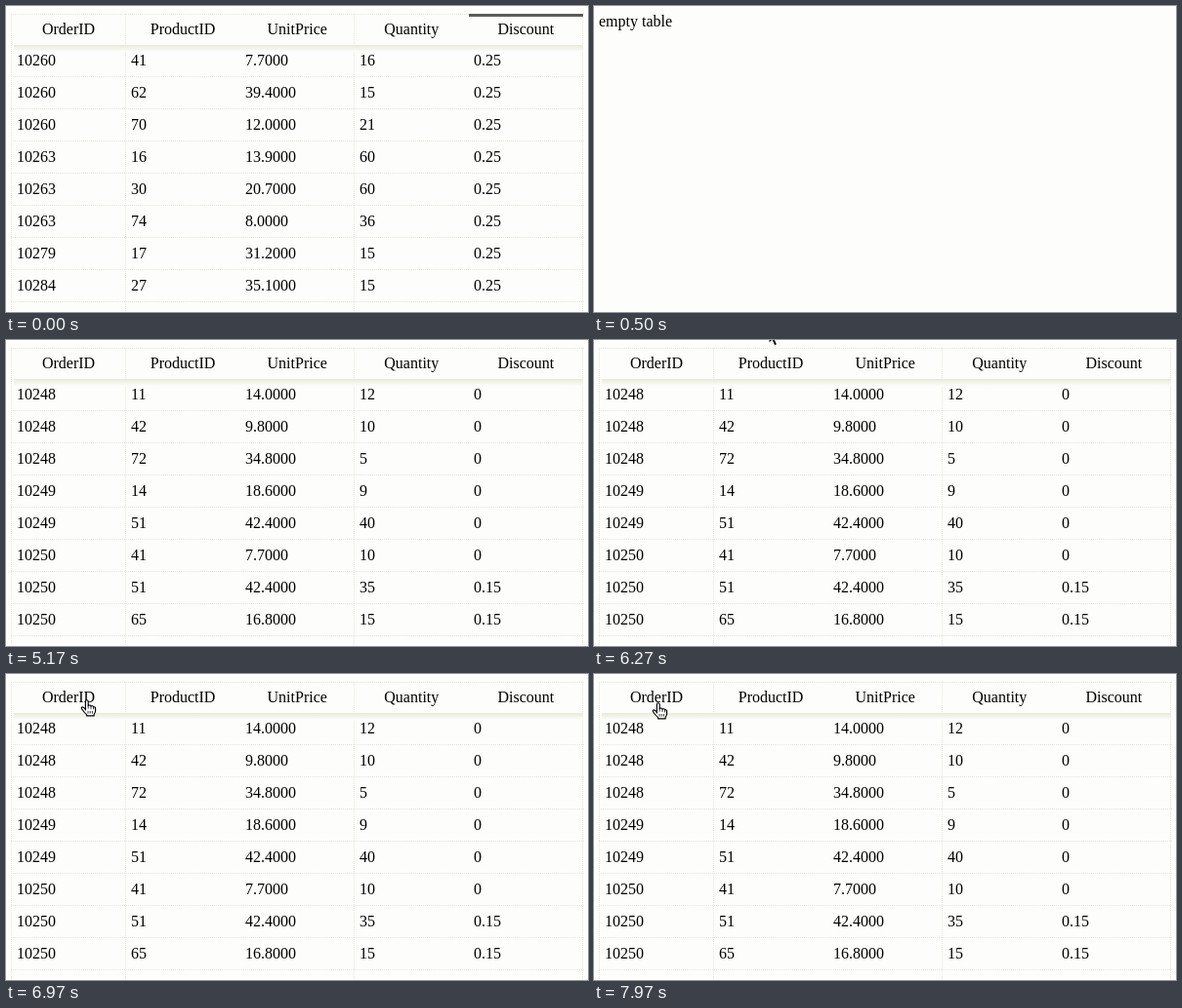
These frames come from a looping animation (596 by 314 pixels, 7990 ms). An HTML page:

```html
<!DOCTYPE html>
<html lang="en">
<head>
<meta charset="utf-8">
<title>Sortable table</title>
<style>
html, body { margin: 0; width: 100%; height: 100%; overflow: hidden; background: #fdfdfb; }
svg { display: block; }
text { font: 16px "Liberation Serif", "Times New Roman", Times, serif; fill: #000; }
.head { text-anchor: middle; }
.rule { stroke: #e6e6da; stroke-dasharray: 1 1; }
</style>
</head>
<body>
<svg width="596" height="314" viewBox="0 0 596 314">
  <defs>
    <linearGradient id="shade" x2="0" y2="1">
      <stop offset="0" stop-color="#e9e9da"/>
      <stop offset="1" stop-color="#fdfdfb"/>
    </linearGradient>
  </defs>
  <rect width="596" height="314" fill="#fdfdfb"/>
  <text id="empty" x="5" y="21">empty table</text>
  <g id="grid"></g>
  <g id="sorted"></g>
  <g id="plain"></g>
  <path id="arrow" d="M0 0V14.6L3.3 11.5L5.7 17L8.4 15.8L6 10.5H10.6Z" fill="#000" stroke="#fff"/>
  <g id="hand" fill="none" stroke="#000">
    <path d="M-.6 10.5V1.2Q-.5-.3 .8-.3T2.2 1.2V5.4Q4.5 4.3 5 6Q7 5.2 7.6 6.8Q9.6 6.3 9.6 8.4V11Q9.2 13 8.2 14.2V15.8H.6V14.6Q-2 12.6-4.5 8.8Q-5.2 7.2-3.8 6.8Q-2.4 6.8-.6 9.3" fill="#fff" stroke-width="1.15" stroke-linejoin="round"/>
    <path d="M2.2 5V8.6M5 6V9M7.6 7V9.4M2 11V13.6M4.2 11V13.6M6.4 11V13.6" stroke-width=".8"/>
  </g>
</svg>
<script>
const LOOP = 7990, LEFT = 5.5, TOP = 8, COL = 117, ROW = 33, ROWS = 8;
const $ = id => document.getElementById(id);

// Each order lists its items as product@price*quantity
const sortedOrders = "10260 41@7.7*16 62@39.4*15 70@12*21, 10263 16@13.9*60 30@20.7*60 74@8*36, 10279 17@31.2*15, 10284 27@35.1*15";
const plainOrders = "10248 11@14*12 42@9.8*10 72@34.8*5, 10249 14@18.6*9 51@42.4*40, 10250 41@7.7*10 51@42.4*35 65@16.8*15";

function add(parent, name, attrs, content = "") {
  const el = document.createElementNS("http://www.w3.org/2000/svg", name);
  for (const key in attrs) el.setAttribute(key, attrs[key]);
  el.textContent = content;
  parent.append(el);
}

function rule(parent, d) {
  add(parent, "path", { d, class: "rule" });
}

function buildGrid(g) {
  rule(g, `M5 ${TOP + 0.5}H592`);
  for (const col of [0, 1, 3, 5]) rule(g, `M${LEFT + col * COL} ${TOP}V314`);
  for (let i = 1; i <= ROWS; i++) rule(g, `M5 ${39.5 + i * ROW}H592`);
  add(g, "rect", { x: 8, y: 40, width: 583, height: 7, fill: "url(#shade)" });
  ["OrderID", "ProductID", "UnitPrice", "Quantity", "Discount"].forEach((name, i) =>
    add(g, "text", { x: 64 + i * (COL + 0.1), y: 29, class: "head" }, name));
}

function buildRows(g, orders, discount) {
  let row = 0;
  for (const order of orders.split(", ")) {
    const [id, ...items] = order.split(" ");
    for (const item of items) {
      const [product, price, quantity] = item.split(/[@*]/);
      [id, product, Number(price).toFixed(4), quantity, discount(row)].forEach((cell, c) =>
        add(g, "text", { x: 11 + c * COL, y: 61 + row * ROW }, cell));
      row++;
    }
  }
}

buildGrid($("grid"));
buildRows($("sorted"), sortedOrders, () => 0.25);
add($("sorted"), "rect", { x: 474, y: TOP, width: COL, height: 3, fill: "#5c5c58" });
buildRows($("plain"), plainOrders, row => row < 6 ? 0 : 0.15);

const clamp = k => Math.max(0, Math.min(1, k));
const span = (t, from, to) => clamp((t - from) / (to - from));
const easeOut = k => k * (2 - k);
const smooth = k => k * k * (3 - 2 * k);

// The pointer drops in from above, settles on the link, then drifts along it
function pointer(t) {
  const enter = span(t, 6150, 6690);
  const settle = easeOut(span(t, 6690, 6970));
  const drift = smooth(span(t, 6970, 7710));
  return [
    200 - 93.5 * enter - 24.5 * settle - 17 * drift,
    -20 + 39 * enter + 8 * settle + 3 * drift
  ];
}

function show(id, on) {
  $(id).style.display = on ? "" : "none";
}

function draw(t) {
  const first = t < 200, last = t >= 5170;
  show("grid", first || last);
  show("sorted", first);
  show("plain", last);
  show("empty", t >= 470 && !last);

  const overLink = t >= 6780;
  show("arrow", t >= 6150 && !overLink);
  show("hand", overLink);
  const [x, y] = pointer(t);
  $(overLink ? "hand" : "arrow").setAttribute("transform", `translate(${x.toFixed(2)} ${y.toFixed(2)})`);
}

const start = performance.now();
function tick(now) {
  draw(Math.max(0, now - start) % LOOP);
  requestAnimationFrame(tick);
}
draw(0);
requestAnimationFrame(tick);
</script>
</body>
</html>
```
